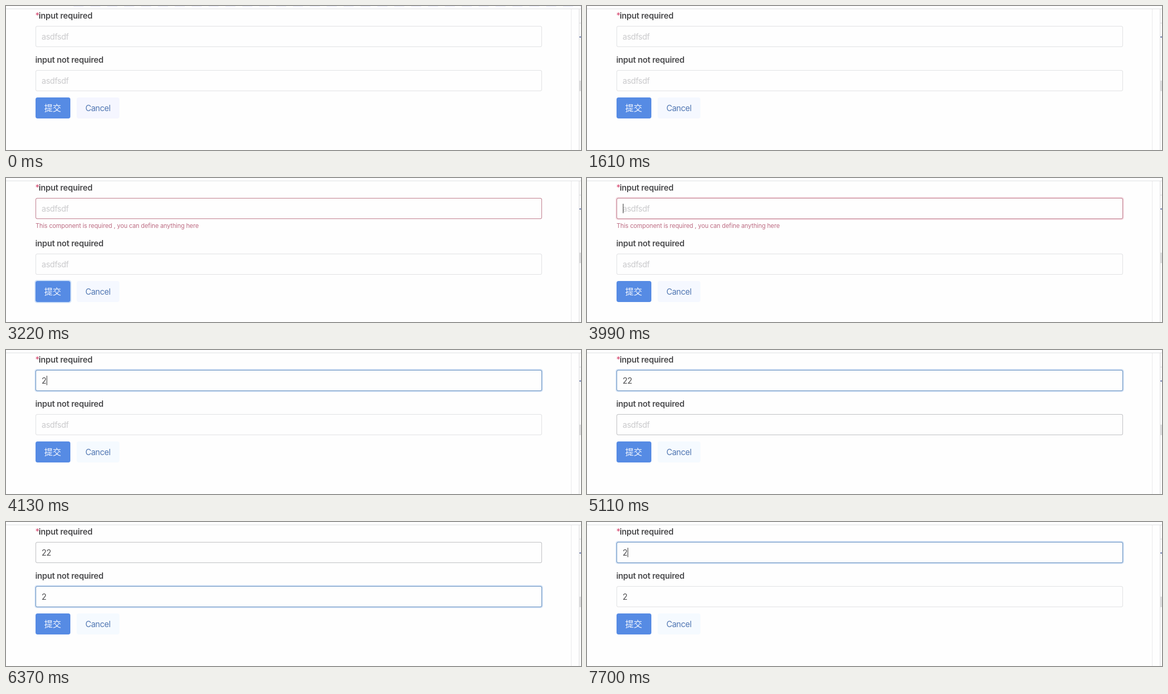
An HTML page with a canvas that plays this animation: 1090x274 px, repeating every 8000 ms.

```html
<!DOCTYPE html>
<html lang="en">
<head>
<meta charset="utf-8">
<title>Form validation</title>
<style>
html, body { margin: 0; width: 1090px; height: 274px; overflow: hidden; background: #fefefe; }
canvas { display: block; }
</style>
</head>
<body>
<canvas id="stage" width="1090" height="274"></canvas>
<script>
const LOOP = 8000;
const ctx = document.getElementById('stage').getContext('2d');
const SANS = 'Inter, "Noto Sans", sans-serif';
const CJK = '"Noto Sans CJK SC", "Noto Sans CJK", sans-serif';

const within = (t, from, to) => t >= from && t < to;

// Value of the last [time, value] step that has begun
function stepAt(t, steps) {
  let value = steps[0][1];
  for (const [start, v] of steps) if (t >= start) value = v;
  return value;
}

function rect(x, y, w, h, color) {
  ctx.fillStyle = color;
  ctx.fillRect(x, y, w, h);
}

function box(x, y, w, h, r, color) {
  ctx.fillStyle = color;
  ctx.beginPath();
  ctx.roundRect(x, y, w, h, r);
  ctx.fill();
}

function text(str, x, y, font, color, spacing = 0) {
  ctx.font = font;
  ctx.letterSpacing = spacing + 'px';
  ctx.fillStyle = color;
  ctx.fillText(str, x, y);
}

function label(str, x, y) {
  text(str, x, y, `600 15.5px ${SANS}`, '#4a4a4c', -0.22);
}

const STYLES = {
  normal: { border: '#dfe0e2' },
  hover: { border: '#bcbdc0' },
  error: { border: '#bd7888' },
  errorFocus: { border: '#bd7888', ring: '#f6dfe5' },
  focus: { border: '#5f8bbd', ring: '#d6e4f6' }
};

function field(y, value, state, caret) {
  const { border, ring } = STYLES[state];
  if (ring) box(54, y - 2, 964, 44, 5, ring);
  box(56, y, 960, 40, 3.5, border);
  box(57, y + 1, 958, 38, 2.5, '#fefefe');
  text(value || 'asdfsdf', 67.5, y + 25.7, `400 15.3px ${SANS}`, value ? '#4c4c4e' : '#cbcbcd', -0.45);
  if (caret) rect(68 + value.length * 9, y + 11, 1, 18, '#303030');
}

function buttons(y, focused, cancelColor) {
  if (focused) box(54, y - 2, 70, 44, 5, '#cfe1f8');
  box(56, y, 66, 40, 4, '#568be4');
  text('提交', 72.5, y + 26, `400 16px ${CJK}`, '#f8faff');
  box(134, y, 81, 40, 4, cancelColor);
  text('Cancel', 150.5, y + 25.7, `400 15.3px ${SANS}`, '#5076b2', -0.45);
}

function chrome(t) {
  rect(0, 0, 1090, 274, '#fefefe');
  rect(0, 5, 1090, 1, '#dedfe1');
  rect(1071, 6, 1, 268, '#e9e9eb');
  rect(1086, 6, 1, 268, '#d9d9db');
  rect(1087, 32, 3, 1, '#d9d9db');
  rect(1087, 58, 3, 2, '#6878ad');
  rect(1087, 142, 3, 20, '#dededf');
  if (t < 70) {
    for (let x = 128; x < 1090; x += 32) rect(x, 0, 19, 1, '#e6e8fb');
  }
}

function draw(t) {
  const first = stepAt(t, [[0, 'normal'], [2590, 'error'], [3640, 'errorFocus'], [4130, 'focus'],
    [5320, 'normal'], [6370, 'hover'], [6650, 'focus']]);
  const second = stepAt(t, [[0, 'normal'], [3150, 'hover'], [3220, 'normal'], [4760, 'hover'],
    [5320, 'focus'], [6650, 'normal']]);
  const firstValue = stepAt(t, [[0, ''], [4130, '2'], [4620, '22'], [7700, '2']]);
  const secondValue = t < 5670 ? '' : '2';
  const firstCaret = within(t, 3640, 5110) || within(t, 6650, 7210) || t >= 7700;
  const secondCaret = within(t, 5320, 6230);
  const invalid = within(t, 2590, 4130);
  const shift = invalid ? 22 : 0;

  chrome(t);
  text('*', 55.5, 24, `500 15.5px ${SANS}`, '#d9587c');
  label('input required', 62, 23.7);
  field(38, firstValue, first, firstCaret);
  if (invalid) {
    text('This component is required , you can define anything here', 56, 95,
      `400 11.5px ${SANS}`, '#bd6c83', -0.13);
  }
  label('input not required', 55.5, 107.7 + shift);
  field(122 + shift, secondValue, second, secondCaret);
  buttons(174 + shift, within(t, 2590, 3640),
    stepAt(t, [[0, '#f5f6ff'], [70, '#f5f8ff'], [4130, '#f5faff']]));
}

const began = performance.now();
function tick() {
  draw((performance.now() - began) % LOOP);
  requestAnimationFrame(tick);
}
tick();
</script>
</body>
</html>
```
